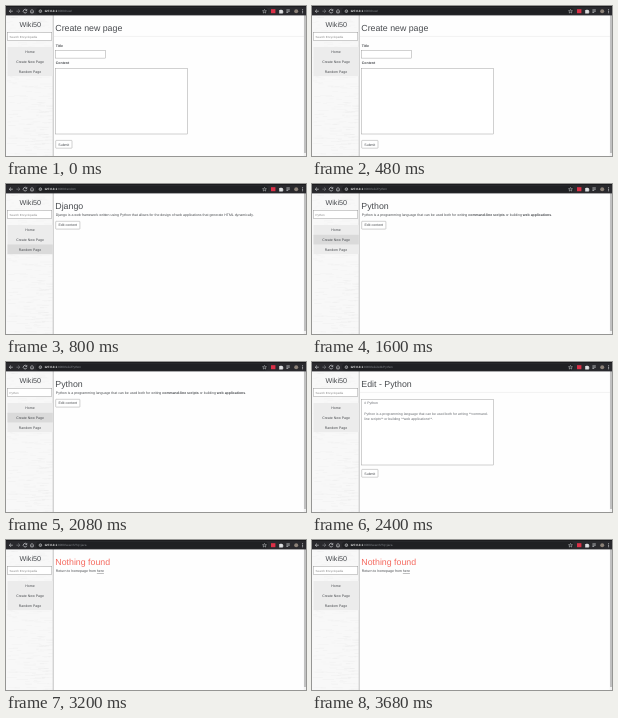
Write an HTML page that moves like this. It is 300 px wide and 150 px high and loops after 4 s.

```html
<!DOCTYPE html>
<html lang="en">
<head>
<meta charset="utf-8">
<title>Encyclopedia demo</title>
<style>
html, body { margin: 0; width: 100%; height: 100%; overflow: hidden; background: #fff; }
svg { display: block; width: 100%; height: 100%; }
text { font-family: "Liberation Sans", Arial, sans-serif; font-size: 3.53px; fill: #484b4f; text-rendering: geometricPrecision; white-space: pre; }
.h1 { font-size: 8.8px; }
.small { font-size: 2.95px; fill: #858585; }
.area { font-size: 3.46px; fill: #666a6f; }
.url { font-size: 3.05px; fill: #85888d; }
.bold { font-weight: 700; }
.mid { text-anchor: middle; }
.box { fill: #fff; stroke: #8c8c8c; stroke-width: .4; }
.icon { fill: none; stroke: #d4d6d9; stroke-width: .65; }
</style>
</head>
<body>
<svg id="stage" viewBox="0 0 300 150" preserveAspectRatio="none">
  <rect width="300" height="150" fill="#fefefe"/>
  <rect y="9" width="47" height="141" fill="#f8f8f8"/>
  <g id="grain" stroke="#e2e2e2" stroke-width=".35"></g>
  <rect x="46.8" y="9" width=".7" height="141" fill="#a8a8a8"/>
  <rect x="297.8" y="9" width="2.2" height="141" fill="#f1f1f1"/>
  <rect x="298" y="9" width="2" height="138" fill="#c1c1c1"/>

  <text x="24.2" y="21.2" class="mid" style="font-size:7.2px">Wiki50</text>
  <rect class="box" x="1.6" y="26.5" width="44.2" height="7.8"/>
  <text id="query" x="3.6" y="31.6" class="small"></text>
  <rect x="1.5" y="41" width="45.3" height="29.2" fill="#ececec"/>
  <rect id="hover" x="1.5" width="45.3" height="9.7" fill="#dadada"/>
  <g id="nav"></g>

  <rect width="300" height="9.4" fill="#29292d"/>
  <rect width="300" height="1" fill="#1b1b1e"/>
  <rect x="30" y="1.7" width="232" height="6.8" rx="3.4" fill="#1f2023"/>
  <g class="icon">
    <path d="M6.8 5.2H3.4M5 3.5L3.3 5.2L5 6.9"/>
    <path d="M10.4 5.2H13.8M12.2 3.5L13.9 5.2L12.2 6.9" stroke="#85878b"/>
    <path d="M20.6 4.2A1.8 1.8 0 1 0 20.8 5.7M20.8 3.1V4.5H19.4"/>
    <path d="M24.2 5.2L26 3.5L27.8 5.2M24.8 4.9V6.9H27.2V4.9"/>
    <circle cx="34.4" cy="5.2" r="1.3"/>
    <path d="M34.4 5V6M34.4 4.2V4.6" stroke-width=".4"/>
    <path d="M258.5 3.4L259.1 4.7L260.5 4.8L259.4 5.7L259.8 7.1L258.5 6.3L257.2 7.1L257.6 5.7L256.5 4.8L257.9 4.7Z" stroke-width=".45"/>
    <path d="M280.4 3.9H283.8M280.4 5.2H283.8M280.4 6.5H282.2"/>
  </g>
  <rect x="265" y="3.2" width="4.4" height="4" fill="#dc3047"/>
  <path d="M273.2 4.1h1.1a.7.7 0 0 1 1.4 0h1.1v1.1a.7.7 0 0 1 0 1.4v.9h-3.6z" fill="#dedfe1"/>
  <circle cx="290.2" cy="5.2" r="2" fill="#8b8178"/>
  <g fill="#d4d6d9"><circle cx="296.6" cy="3.7" r=".5"/><circle cx="296.6" cy="5.2" r=".5"/><circle cx="296.6" cy="6.7" r=".5"/></g>
  <text x="38.4" y="6.3" class="url"><tspan fill="#eee" class="bold">127.0.0.1</tspan><tspan id="path"></tspan></text>
  <g id="page"></g>
</svg>
<script>
const $ = id => document.getElementById(id);
const HOLD = 800;

const text = (x, y, s, cls = "", style = "") =>
  `<text x="${x}" y="${y}" class="${cls}" style="${style}">${s}</text>`;
const box = (x, y, w, h, r = 0) =>
  `<rect class="box" x="${x}" y="${y}" width="${w}" height="${h}" rx="${r}"/>`;
const title = (s, color = "#484b4f") => text(49.3, 24.9, s, "h1", `fill:${color}`);
const body = s => text(49.8, 32.2, s);
const button = (s, y, w) =>
  box(49.7, y, w, 7.8, .6) + text(49.7 + w / 2, y + 5.1, s, "mid");
const rule = '<path d="M48 30.4H298" stroke="#e2e2e2" stroke-width=".5"/>';
const bold = s => `<tspan class="bold">${s}</tspan>`;

// path: address after the host; row: highlighted menu entry
const pages = [
  { path: ":8000/new/", row: -1,
    html: title("Create new page") + rule +
      text(49.8, 40.6, "Title", "bold") + box(49.7, 44.2, 49.8, 7.9) +
      text(49.8, 58.4, "Content", "bold") + box(49.7, 62.4, 131.8, 65.6) +
      button("Submit", 134.4, 16.3) },
  { path: ":8000/random", row: 2,
    html: title("Django") +
      body("Django is a web framework written using Python that allows for the design of web applications that generate HTML dynamically.") +
      button("Edit content", 37.3, 24.2) },
  { path: ":8000/wiki/Python", row: 1, query: "Python",
    html: title("Python") +
      body(`Python is a programming language that can be used both for writing ${bold("command-line scripts")} or building ${bold("web applications")}.`) +
      button("Edit content", 37.3, 24.2) },
  { path: ":8000/wiki/edit/Python", row: -1,
    html: title("Edit - Python") + rule + box(49.7, 37.4, 131.8, 65.6) +
      text(52.3, 42.2, "# Python", "area") +
      text(52.3, 52.6, "Python is a programming language that can be used both for writing **command-", "area") +
      text(52.3, 57.8, "line scripts** or building **web applications**.", "area") +
      button("Submit", 107.4, 16.3) },
  { path: ":8000/search/?q=java", row: -1,
    html: title("Nothing found", "#f56a5f") +
      body('Return to homepage from <tspan text-decoration="underline">here</tspan>') }
];

$("nav").innerHTML = ["Home", "Create New Page", "Random Page"]
  .map((s, i) => text(24, 47 + i * 9.75, s, "mid")).join("");

// Faint horizontal wood grain
let seed = 7;
const rnd = () => (seed = seed * 16807 % 2147483647) / 2147483647;
let strokes = "";
for (let i = 0; i < 260; i++) {
  const x = rnd() * 44, len = 2 + rnd() * 10;
  strokes += `<path d="M${x} ${11 + rnd() * 139}H${Math.min(46.8, x + len)}" opacity="${.2 + rnd() * .5}"/>`;
}
$("grain").innerHTML = strokes;

let shown = -1;
function render(ms) {
  const i = Math.floor(ms / HOLD) % pages.length;
  if (i === shown) return;
  shown = i;
  const p = pages[i];
  $("path").textContent = p.path;
  $("query").textContent = p.query || "Search Encyclopedia";
  $("hover").setAttribute("y", 41 + Math.max(0, p.row) * 9.75);
  $("hover").setAttribute("visibility", p.row < 0 ? "hidden" : "visible");
  $("page").innerHTML = p.html;
}

const start = performance.now();
function tick() {
  render(performance.now() - start);
  requestAnimationFrame(tick);
}
tick();
</script>
</body>
</html>
```
